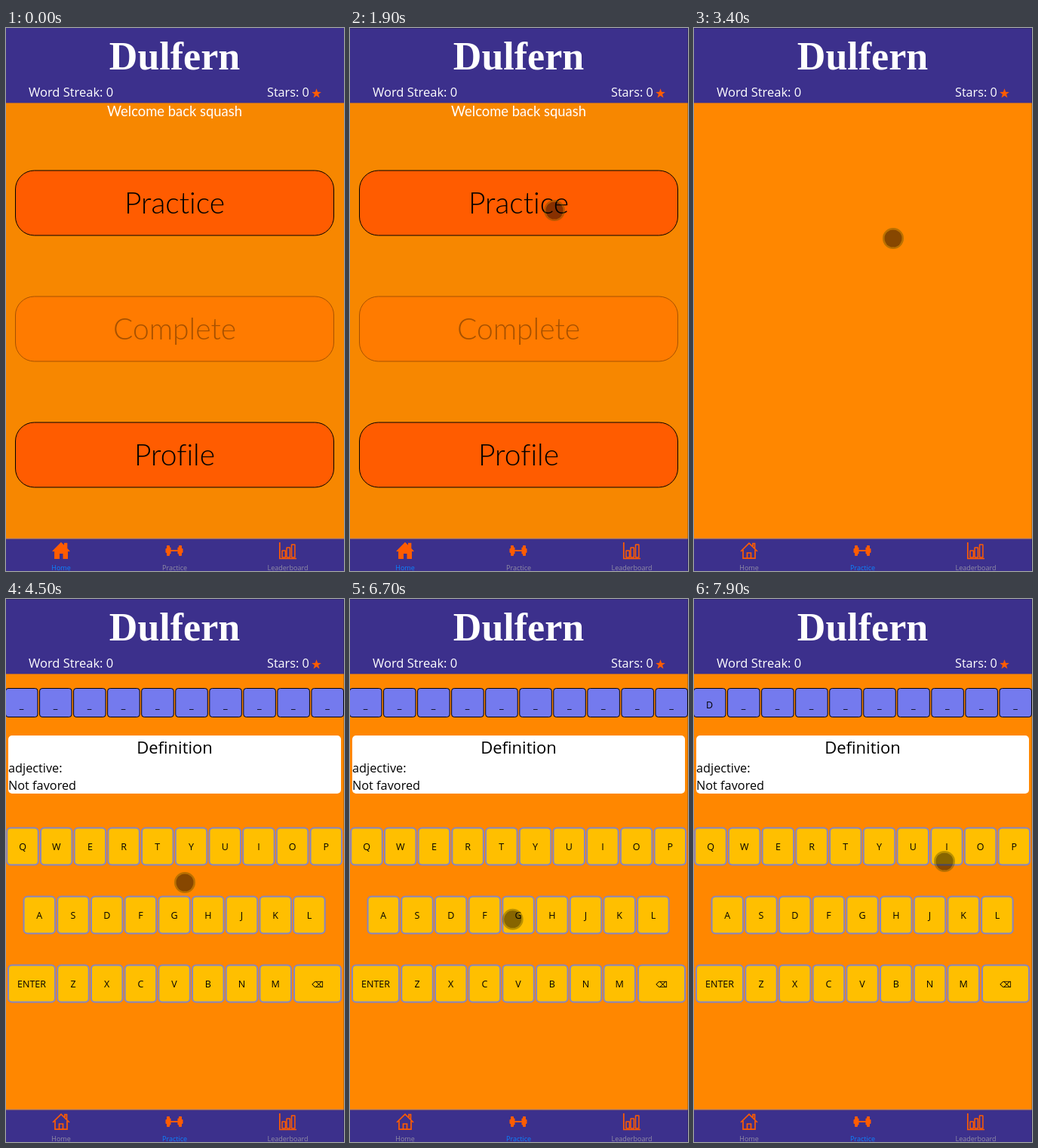
An HTML page for the animation above (8000 ms loop, 448 px wide and 720 px high).

```html
<!DOCTYPE html>
<html lang="en">
<head>
<meta charset="utf-8">
<title>Word game</title>
<style>
  html, body { margin: 0; height: 100%; overflow: hidden; background: #ff8700; }
  svg { display: block; width: 448px; height: 720px; }
  text { font-family: "Open Sans", "Noto Sans", sans-serif; }
  .round { font-family: Lato, sans-serif; font-variant-ligatures: none; }
  .light { font-weight: 300; }
  .logo { font: bold 52px "Liberation Serif", serif; }
  .symbol { font-family: "DejaVu Sans", sans-serif; }
  .mid { text-anchor: middle; }
  .line { fill: none; stroke: #ff5c00; stroke-width: 1.7; }
</style>
</head>
<body>
<svg id="stage" viewBox="0 0 448 720"></svg>
<script>
const LOOP = 8000, STEP = 100;
const ORANGE = '#ff5c00', PURPLE = '#3c308c', GRAY = '#918da4', BLUE = '#0a84ff';

const rect = (x, y, w, h, r, fill, extra = '') =>
  `<rect x="${x}" y="${y}" width="${w}" height="${h}" rx="${r}" fill="${fill}" ${extra}/>`;
const text = (str, x, y, size, cls = '', fill = '#000', extra = '') =>
  `<text x="${x}" y="${y}" font-size="${size}" class="${cls}" fill="${fill}" ${extra}>${str}</text>`;

function star(cx, cy, r) {
  const points = Array.from({ length: 10 }, (_, i) => {
    const a = i * Math.PI / 5, d = i % 2 ? r * 0.4 : r;
    return `${cx + d * Math.sin(a)},${cy - d * Math.cos(a)}`;
  });
  return `<polygon points="${points.join(' ')}" fill="${ORANGE}"/>`;
}

function header() {
  return rect(0, 0, 448, 99.4, 0, PURPLE) +
    text('Dulfern', 223.5, 55, 52, 'logo mid', '#fff') +
    text('Word Streak: 0', 30, 91, 16.5, '', '#fff') +
    text('Stars: 0', 346, 91, 16.2, '', '#fff') +
    star(411.5, 87, 6.7);
}

function bigButton(label, y, fill = ORANGE, ink = '#000') {
  return rect(12.5, y, 422, 86, 25, fill, `stroke="${ink}"`) +
    text(label, 223.5, y + 56.5, 39, 'round light mid', ink);
}

function home() {
  return rect(0, 99, 448, 578, 0, '#f78700') +
    text('Welcome back squash', 223.5, 117, 18.4, 'round mid', '#fff') +
    bigButton('Practice', 189) +
    bigButton('Complete', 356, '#ff7b00', '#a75100') +
    bigButton('Profile', 523);
}

function key(label, cx, y, w = 41.5) {
  const symbol = label === '⌫';
  return rect(cx - w / 2, y, w, 49, 5, '#ffbf00', 'stroke="#8585c4" stroke-width="2"') +
    text(label, cx, y + 29.5, symbol ? 11 : 12.5, symbol ? 'symbol mid' : 'mid');
}
const keyRow = (letters, cx, y) =>
  [...letters].map((c, i) => key(c, cx + i * 44.7, y)).join('');

function game() {
  let tiles = '';
  for (let i = 0; i < 10; i++) {
    const x = -0.5 + i * 45.05;
    tiles += rect(x, 118.5, 42.5, 38, 3.5, '#747aee', 'stroke="#000"') +
      text('_', x + 21, 145, 12.5, 'mid', '#000', i ? '' : 'id="firstTile"');
  }
  return tiles +
    rect(3, 181, 441, 77, 5, '#fff') +
    text('Definition', 223.5, 205, 22, 'mid') +
    text('adjective:', 3, 230, 16.3) +
    text('Not favored', 3, 253, 16.3) +
    keyRow('QWERTYUIOP', 22, 303.5) +
    keyRow('ASDFGHJKL', 44.3, 394.5) +
    key('ENTER', 34, 485.5, 62) +
    keyRow('ZXCVBNM', 89, 485.5) +
    key('⌫', 413, 485.5, 62);
}

function nav() {
  const weights = [[9, 2.5, 6], [6, 4, 14], [4.5, 2, 9]].map(([d, w, h]) =>
    rect(223 - d - w, 693 - h / 2, w, h, 1, ORANGE) +
    rect(223 + d, 693 - h / 2, w, h, 1, ORANGE)).join('');
  const bars = [[366, 9], [372, 13], [378.5, 17]]
    .map(([x, h]) => rect(x, 702 - h, 4.4, h, 0.5, 'none', `stroke="${ORANGE}" stroke-width="1.5"`)).join('');
  return rect(0, 676.5, 448, 1, 0, '#a58a86') + rect(0, 677.5, 448, 43, 0, PURPLE) +
    `<path class="line" d="M62 694L73 683.2 84 694M78 687V683.5H80.5V690M65 692V703.2H81V692"/>` +
    `<path class="line" id="houseDoor" d="M70.5 703V696H75.5V703"/>` +
    `<g id="houseFull"><path d="M61.5 694L73 682 77 686V683H81V690L84.5 694H82V704H64.5V694Z" fill="${ORANGE}"/>` +
    rect(71, 697, 4.5, 7, 0, PURPLE) + '</g>' +
    weights + rect(218, 692, 10, 2, 0, ORANGE) +
    `<path class="line" d="M362.8 682V703.5H385"/>` + bars +
    text('Home', 73, 719, 9, 'mid', GRAY, 'id="homeLabel"') +
    text('Practice', 223.5, 719, 9, 'mid', GRAY, 'id="practiceLabel"') +
    text('Leaderboard', 373.5, 719, 9, 'mid', GRAY);
}

document.getElementById('stage').innerHTML =
  rect(0, 0, 448, 720, 0, '#ff8700') +
  `<g id="home">${home()}</g><g id="game">${game()}</g>` + header() + nav() +
  `<path id="edge" d="M0 .5H447.5V720" fill="none" stroke="#000" stroke-opacity=".2"/>
  <g id="pointer">
    <circle id="press" r="31" fill="#ffdc30" fill-opacity=".82"/>
    <circle r="12.7" fill="none" stroke="#5a5000" stroke-opacity=".42" stroke-width="2.6"/>
    <circle r="11.5" fill="#000" fill-opacity=".47"/>
  </g>`;

// Pointer path: time, x, y
const path = [
  [700, 340, 470], [1500, 285, 262], [1900, 271, 242], [3000, 271, 242],
  [3400, 264, 279], [3900, 237, 376], [4600, 237, 376], [5400, 234, 424],
  [5600, 233, 425], [6600, 233, 425], [7200, 129, 424], [7500, 129, 424], [7900, 332, 348]
];

function pointerAt(t) {
  const next = path.findIndex(p => p[0] > t);
  if (next < 0) return path[path.length - 1].slice(1);
  if (next === 0) return path[0].slice(1);
  const [t0, x0, y0] = path[next - 1], [t1, x1, y1] = path[next];
  const k = (t - t0) / (t1 - t0);
  return [x0 + (x1 - x0) * k, y0 + (y1 - y0) * k];
}

const $ = id => document.getElementById(id);
const show = (id, on) => $(id).setAttribute('visibility', on ? 'visible' : 'hidden');
const within = (t, a, b) => t >= a && t < b;

function draw(now) {
  const t = Math.floor(now % LOOP / STEP) * STEP;
  const atHome = t < 2700;
  show('home', atHome);
  show('game', t >= 4500);
  show('houseFull', atHome);
  show('houseDoor', !atHome);
  show('edge', t >= 100);
  show('pointer', t >= 700);
  show('press', within(t, 2500, 2700) || within(t, 7300, 7500));
  $('homeLabel').setAttribute('fill', atHome ? BLUE : GRAY);
  $('practiceLabel').setAttribute('fill', atHome ? GRAY : BLUE);
  $('firstTile').textContent = t >= 7400 ? 'D' : '_';
  $('pointer').setAttribute('transform', `translate(${pointerAt(t)})`);
}

// The press highlight and hidden scenes inherit nothing from the pointer group.
const start = performance.now();
function tick() {
  draw(performance.now() - start);
  requestAnimationFrame(tick);
}
tick();
</script>
</body>
</html>
```
